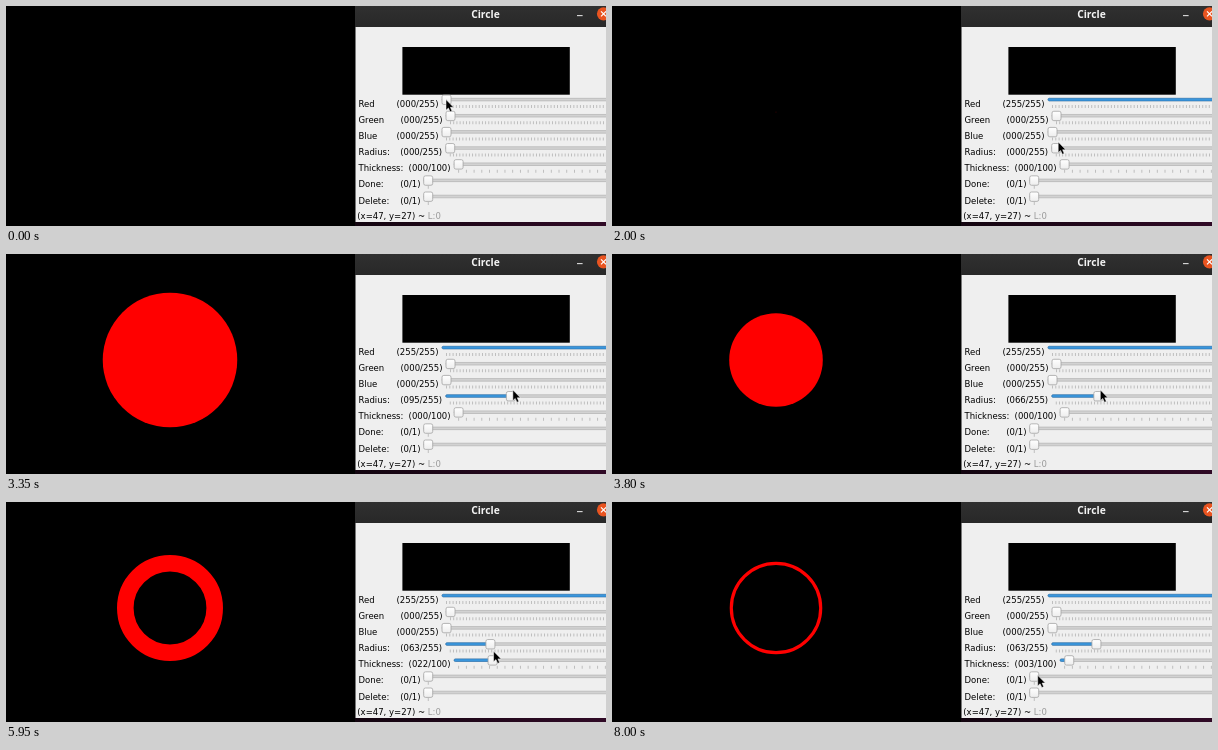
Recreate the animation shown at these times as an HTML page. Size 600x220 px, loop 8.05 s.

```html
<!DOCTYPE html>
<html lang="en">
<head>
<meta charset="utf-8">
<title>Circle</title>
<style>
html, body { margin: 0; width: 100%; height: 100%; overflow: hidden; background: #000; }
svg { display: block; }
text { font: 8.5px "DejaVu Sans", sans-serif; fill: #000; white-space: pre; }
.title { font: bold 10.3px "Open Sans", sans-serif; fill: #f4f4f4; }
</style>
</head>
<body>
<svg width="600" height="220" viewBox="0 0 600 220">
  <defs>
    <linearGradient id="desk">
      <stop offset="0" stop-color="#12040f"/>
      <stop offset="1" stop-color="#300a26"/>
    </linearGradient>
    <linearGradient id="bar" x2="0" y2="1">
      <stop offset="0" stop-color="#303030"/>
      <stop offset="1" stop-color="#282828"/>
    </linearGradient>
    <linearGradient id="cap" x2="0" y2="1">
      <stop offset="0" stop-color="#fff"/>
      <stop offset="1" stop-color="#ededed"/>
    </linearGradient>
  </defs>
  <rect width="600" height="220"/>
  <circle id="disc" cx="164" cy="106"/>

  <rect x="349" y="216" width="251" height="4" fill="url(#desk)"/>
  <rect x="349.5" width="251" height="216" fill="#efefef"/>
  <rect x="349" width="251" height="21" fill="url(#bar)"/>
  <text class="title" x="479.5" y="11.7" text-anchor="middle">Circle</text>
  <path d="M571 9.6h5.6" stroke="#ddd" stroke-width="1.1"/>
  <circle cx="597.5" cy="7.8" r="6.6" fill="#e95420"/>
  <path d="M595 5.3l5 5m0-5l-5 5" stroke="#fff" stroke-width="1.2"/>
  <rect x="396.4" y="41" width="167.4" height="47.7"/>
  <g id="rows"></g>
  <text x="351.3" y="213">(x=47, y=27) ~ <tspan fill="#999">L:0</tspan></text>
  <path id="cursor" d="M0 0V10.6L2.4 8.4L4.1 12.2L6 11.4L4.4 7.7H7.6Z" fill="#000" stroke="#fff" stroke-width=".5"/>
</svg>
<script>
const LOOP = 8050, STEP = 50, SCALE = 0.705, TRACK_END = 607;
const $ = id => document.getElementById(id);

function add(parent, tag, attrs, text) {
  const el = document.createElementNS("http://www.w3.org/2000/svg", tag);
  set(el, attrs);
  if (text) el.textContent = text;
  return parent.appendChild(el);
}

function set(el, attrs) {
  for (const k in attrs) el.setAttribute(k, attrs[k]);
}

function makeRow([label, valueX, max], i) {
  const g = $("rows"), y = 93.6 + i * 16.15;
  const digits = String(max).length;
  const zero = valueX + 17 + 11 * digits, left = zero - 4.5;
  const unit = (TRACK_END - zero) / max;
  const bar = { x: left, y: y - 1.3, height: 2.6, rx: 1.3, "stroke-width": 0.6 };

  add(g, "text", { x: 352.5, y: y + 7 }, label);
  const value = add(g, "text", { x: valueX, y: y + 7 });
  add(g, "rect", { ...bar, width: 200, fill: "#d2d2d2", stroke: "#aaa" });
  const fill = add(g, "rect", { ...bar, fill: "#3a96dc", stroke: "#2a74b4" });
  const ticks = add(g, "path", {
    d: `M${zero - 0.4} ${y + 7}H600`, "stroke-width": 3,
    "stroke-dasharray": `.9 ${5 * unit - 0.9}`
  });
  const knob = add(g, "rect", { y: y - 4.5, width: 9, height: 9.4, rx: 1.8, fill: "url(#cap)", stroke: "#a4a4a4", "stroke-width": 0.8 });

  const row = { y, x: zero };
  row.show = (v, tickColor = "#b9b9b9") => {
    row.x = zero + v * unit;
    value.textContent = `(${String(v).padStart(digits, "0")}/${max})`;
    set(fill, { width: row.x - left, visibility: v ? "visible" : "hidden" });
    set(knob, { x: row.x - 4.5 });
    set(ticks, { stroke: tickColor });
  };
  row.show(0);
  return row;
}

const [red, , , radius, thickness, done] = [
  ["Red", 390.5, 255],
  ["Green", 394.5, 255],
  ["Blue", 390.5, 255],
  ["Radius:", 394.2, 255],
  ["Thickness:", 402.6, 100],
  ["Done:", 394.2, 1],
  ["Delete:", 394.2, 1]
].map(makeRow);

const ramp = (t, from, to) => Math.min(1, Math.max(0, (t - from) / (to - from)));
const easeOut = (u, power) => 1 - (1 - u) ** power;
const mix = (a, b, u) => a + (b - a) * u;

function draw(time) {
  const t = Math.floor(time / STEP) * STEP;
  const redValue = Math.round(255 * ramp(t, 0, 1050));
  const size = Math.round(120 * ramp(t, 2350, 3150) ** 1.15 - 57 * easeOut(ramp(t, 3150, 4050), 2.3));
  const line = Math.round(23 * easeOut(ramp(t, 5300, 6050), 1.56) - 20 * ramp(t, 6200, 7050));

  red.show(redValue, t >= 850 && t < 1250 ? "#666" : undefined);
  radius.show(size, t >= 4150 && t < 5350 ? "#5c86ad" : undefined);
  thickness.show(line);

  const color = `rgb(${redValue},0,0)`;
  set($("disc"), {
    r: (size + 0.4) * SCALE,
    fill: line ? "none" : color,
    stroke: line ? color : "none",
    "stroke-width": (line + 1.5) * SCALE
  });

  // the pointer holds one knob at a time and glides to the next
  const lift = ramp(t, 5100, 5200) - ramp(t, 6200, 7050);
  const toRadius = ramp(t, 1200, 2000), toThickness = ramp(t, 4050, 4400), toDone = ramp(t, 7150, 7750);
  const glide = (a, b, c, d) => mix(mix(mix(a, b, toRadius), c, toThickness), d, toDone);
  const x = glide(red.x - 0.5, radius.x + 2, thickness.x - 1.5 + 2.5 * lift, done.x + 3.5);
  const y = glide(red.y, radius.y - 6, thickness.y + 2 - 11 * lift, done.y - 1);
  set($("cursor"), { transform: `translate(${x} ${y})` });
}

const start = performance.now();
function loop() {
  draw((performance.now() - start) % LOOP);
  requestAnimationFrame(loop);
}
loop();
</script>
</body>
</html>
```
